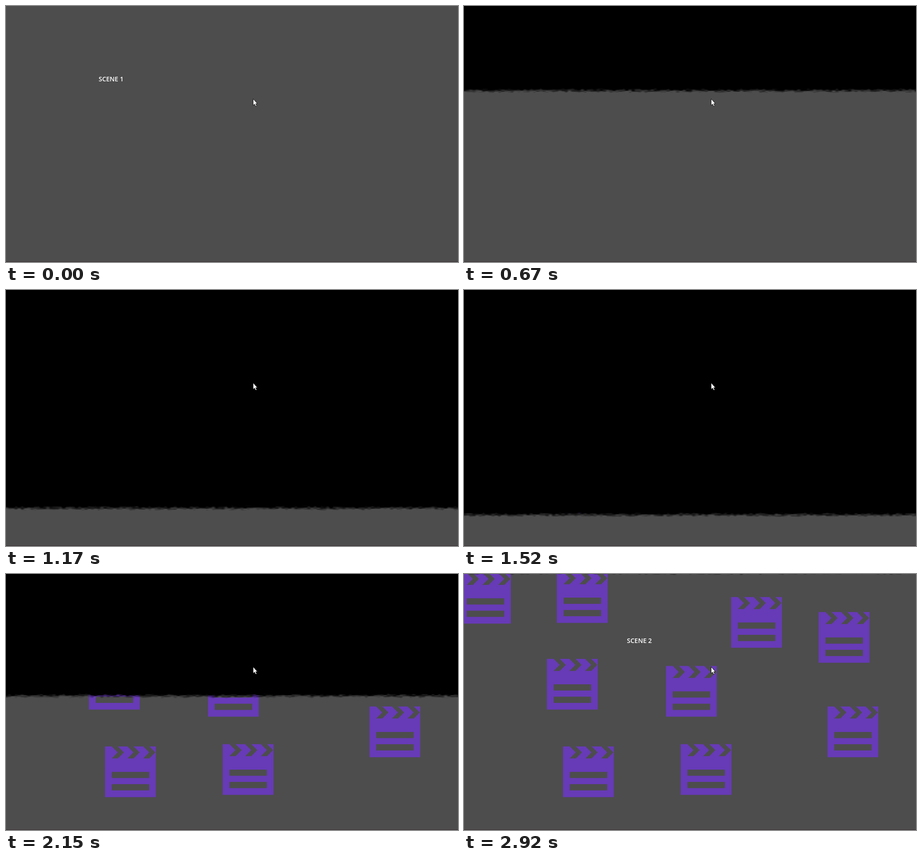
Write an HTML page with a canvas that moves like this. It is 994 px wide and 564 px high and loops after 5.07 s.

```html
<!DOCTYPE html>
<html lang="en">
<head>
<meta charset="utf-8">
<title>Scene transition</title>
<style>
  html, body { margin: 0; width: 100%; height: 100%; overflow: hidden; background: #4d4d4d; }
  svg, canvas { position: absolute; left: 0; top: 0; width: 994px; height: 564px; }
  text { font: 600 14px "Open Sans", "Noto Sans", sans-serif; fill: #fff; }
</style>
</head>
<body>
<svg viewBox="0 0 994 564">
  <defs>
    <path id="cut" d="M14.8 -1V0L28 13.2L14.8 26.4H28.4L41.6 13.2L28.4 0V-1Z" fill="#4d4d4d"/>
    <g id="clapper">
      <rect width="111.7" height="111.7" fill="#673ab7"/>
      <path d="M14.8 0H28.4L41.6 13.2L28.4 26.4H14.8L28 13.2Z
               m34.6 0h13.6l13.2 13.2l-13.2 13.2h-13.6l13.2 -13.2Z
               m34.6 0h13.6l13.2 13.2l-13.2 13.2h-13.6l13.2 -13.2Z
               M14.8 56h82.4v13.7h-82.4Z M14.8 83.2h82.4v13.7h-82.4Z" fill="#4d4d4d"/>
    </g>
  </defs>
  <g id="first"><text x="203.7" y="166">SCENE 1</text></g>
  <g id="second"><text x="358.3" y="152">SCENE 2</text></g>
</svg>
<canvas id="veil" width="994" height="564"></canvas>
<svg viewBox="0 0 994 564">
  <path d="M543.5 204.5V219L546.7 216.1L549 221L551.4 219.9L549.2 215.2H553Z" fill="#fff" stroke="#111"/>
  <rect y="563" width="994" height="1" fill="#3a3036"/>
</svg>
<script>
const LOOP = 5070, W = 994, H = 564;
const TURN = 1328;                 // screen fully covered, scenes swap
const DOWN = 0.53, UP = 0.36;      // wipe speeds in px per ms
const first = document.getElementById('first');
const second = document.getElementById('second');
const ctx = document.getElementById('veil').getContext('2d');

const spots = [[-8.7, -2.4], [204.2, -4], [587.4, 50.8], [780, 83.8], [182.3, 187],
  [444.2, 202.6], [799.3, 291.9], [217.7, 379.9], [476.5, 374.9]];
for (const [x, y] of spots) {
  const use = document.createElementNS('http://www.w3.org/2000/svg', 'use');
  use.setAttribute('href', '#clapper');
  use.setAttribute('transform', `translate(${x} ${y})`);
  second.prepend(use);
}

const steps = [0, 330, 400, 470, 550, 615, 680, 745, 810, 900];
for (let t = 960; t <= 2920; t += 70) steps.push(t);

function hash(x, y) {
  const s = Math.sin(x * 127.1 + y * 311.7) * 43758.5453;
  return s - Math.floor(s);
}

function noise(x, y) {
  const ease = v => v * v * (3 - 2 * v);
  const mix = (a, b, k) => a + (b - a) * k;
  const i = Math.floor(x), j = Math.floor(y), u = ease(x - i), v = ease(y - j);
  return mix(mix(hash(i, j), hash(i + 1, j), u), mix(hash(i, j + 1), hash(i + 1, j + 1), u), v);
}

function drawVeil(edge) {
  ctx.clearRect(0, 0, W, H);
  const top = Math.floor(edge) - 5;
  ctx.fillRect(0, 0, W, Math.max(0, top));
  for (let y = Math.max(0, top); y < Math.min(H, top + 11); y++) {
    for (let x = 0; x < W; x += 2) {
      const rough = (noise(x / 7, y / 2.5) - 0.5) * 5;
      ctx.globalAlpha = Math.min(1, Math.max(0, 0.5 + (edge - y + rough) / 7));
      ctx.fillRect(x, y, 2, 1);
    }
  }
  ctx.globalAlpha = 1;
}

let shown = -1;
function frame(now) {
  const t = steps.findLast(s => s <= now % LOOP);
  if (t !== shown) {
    shown = t;
    first.style.display = t < TURN ? '' : 'none';
    second.style.display = t < TURN ? 'none' : '';
    if (t === 0) ctx.clearRect(0, 0, W, H);
    else drawVeil(t < TURN ? H - (TURN - t) * DOWN : Math.max(-3, H - (t - TURN) * UP));
  }
  requestAnimationFrame(frame);
}
const start = performance.now();
requestAnimationFrame(function tick() {
  frame(Math.max(0, performance.now() - start));
});
</script>
</body>
</html>
```
